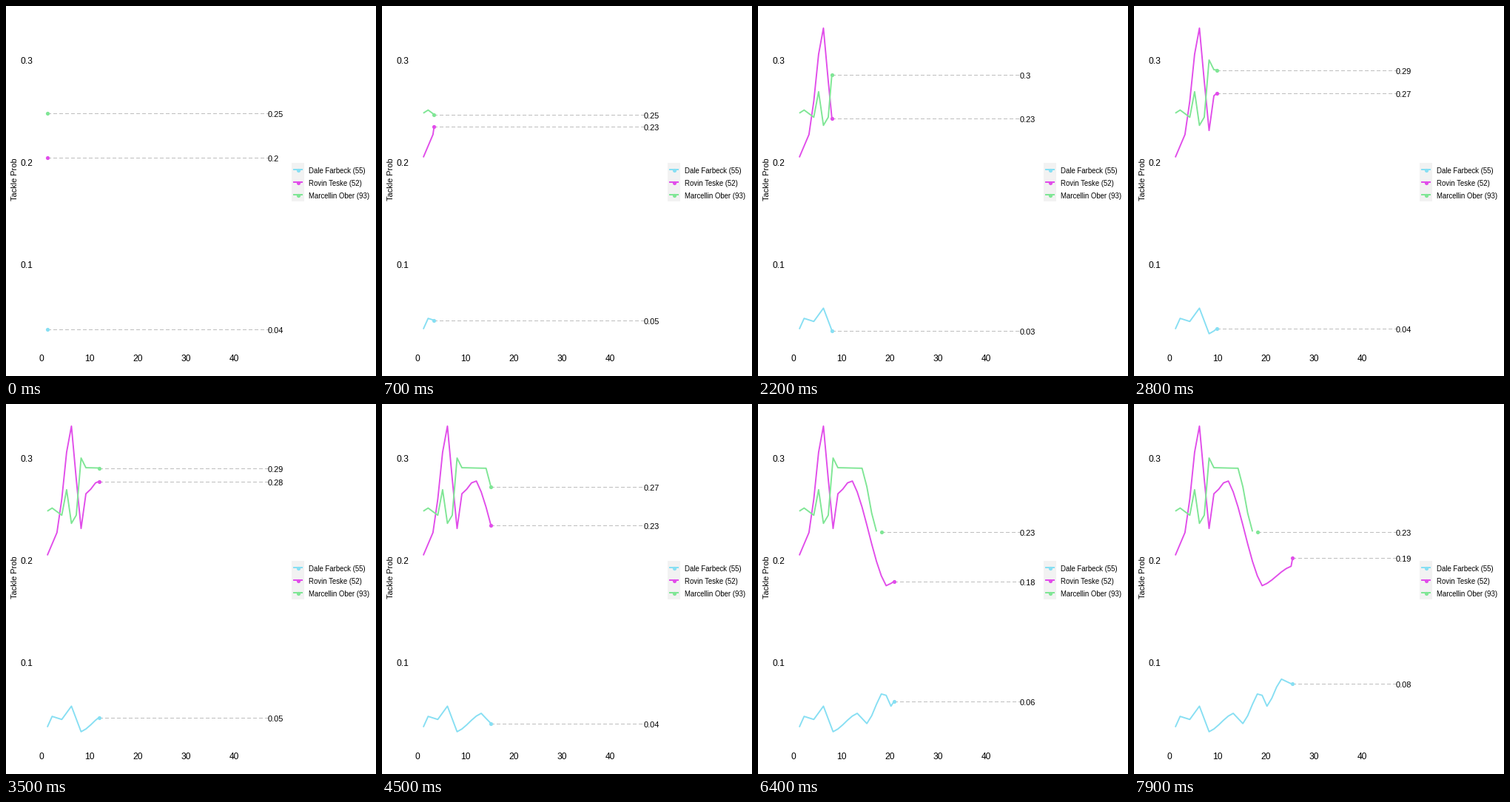
A matplotlib script for the animation above (8000 ms loop, 500 px wide and 500 px high).

```python
import numpy as np
import matplotlib.pyplot as plt
from matplotlib.animation import FuncAnimation
from matplotlib.patches import Rectangle

PX = 0.72                      # points per pixel at 100 dpi
FRAMES, INTERVAL = 80, 100
SPAN, STEPS = 46, 149          # time units covered by the full reveal
X0, DX = 49.3, 6.52            # pixel of x = 0, pixels per unit
Y0, DY = 487.0, 1380.0         # pixel of y = 0, pixels per unit

plt.rcParams["font.family"] = "Liberation Sans"

# name, colour, last time, turning points (time, probability in thousandths)
PLAYERS = [
    ("Dale Farbeck (55)", "#87DFF3", 26,
     [(1, 36.5), (2, 47), (4, 44), (6, 57), (8, 32), (13, 50), (15, 40),
      (18.5, 72), (20, 57), (23, 83.5), (25, 79)]),
    ("Rovin Teske (52)", "#E14DEA", 26,
     [(1, 204.7), (3, 227), (5.9, 334), (8, 231), (9, 265), (11.8, 279),
      (19, 175), (25, 194), (26, 220)]),
    ("Marcellin Ober (93)", "#7FE695", 18,
     [(1, 248), (2, 251), (4, 244), (5, 269), (6, 236), (7, 244), (8, 300),
      (9, 290.5), (14, 290), (17, 228)]),
]

fig = plt.figure(figsize=(5, 5), dpi=100, facecolor="white")
ax = fig.add_axes([0, 0, 1, 1])
ax.set_xlim(0, 500)
ax.set_ylim(500, 0)
ax.axis("off")


def px(t):
    return X0 + DX * np.asarray(t)


def py(v):
    return Y0 - DY * np.asarray(v)


def curve(t, points):
    """Softly eased path through the turning points."""
    kt, kv = np.transpose(points)
    index = np.arange(len(kt))
    pos = np.interp(t, kt, index)
    base = np.floor(pos)
    u = pos - base
    ease = u / 2 + (1 - np.cos(np.pi * u)) / 4
    return np.interp(base + ease, index, kv) / 1000


def label(x, y, s, size, ha="left", **kw):
    return ax.text(x, y, s, fontsize=size * PX, ha=ha, va="center_baseline", **kw)


def line(color, width, **kw):
    return ax.plot([], [], color=color, lw=width * PX, solid_capstyle="butt", **kw)[0]


def dot(color):
    return ax.plot([], [], "o", color=color, ms=5.2 * PX, mew=0, zorder=4)[0]


for v in (0.1, 0.2, 0.3):
    label(36.5, py(v), f"{v:g}", 12, "right")
for t in range(0, 50, 10):
    label(px(t) - 1.2, 475, str(t), 12, "center")
ax.text(12, 234.5, "Tackle Prob", fontsize=11 * PX, rotation=90,
        ha="center", va="center")
ax.add_patch(Rectangle((386, 212), 17, 52, fc="#F2F2F2", ec="none"))


class Track:
    def __init__(self, row, name, color, end, points):
        self.t = np.arange(1, end + 1)
        self.v = curve(self.t, points)
        self.keys = np.round((self.t - 1) * STEPS / SPAN)
        self.dash = line("#BEBEBE", 1, linestyle=(0, (5, 4)), zorder=1,
                         antialiased=False, dash_capstyle="butt")
        self.path = line(color, 1.9, zorder=3)
        self.dot = dot(color)
        self.text = label(354, 0, "", 11, zorder=5)

        y = 221 + 17 * row
        line(color, 2).set_data([388, 401], [y, y])
        dot(color).set_data([394.5], [y + 0.5])
        label(409, y + 1, name, 9.6)

    def draw(self, f):
        t, v = np.interp(f, self.keys, self.t), np.interp(f, self.keys, self.v)
        x, y = px(t), np.floor(py(v)) + 0.5
        past = self.keys < min(f, self.keys[-1])
        xs, ys = px(self.t[past]), py(self.v[past])
        if f <= self.keys[-1]:
            xs, ys = np.append(xs, x), np.append(ys, y)
        self.path.set_data(xs, ys)
        self.dash.set_data([x, px(SPAN + 1)], [y, y])
        self.dot.set_data([x], [y])

        # the label jumps to the next value halfway between points
        i = np.searchsorted(self.keys, f, side="right") - 1
        if i + 1 < len(self.keys) and 2 * f >= self.keys[i] + self.keys[i + 1]:
            i += 1
        self.text.set_text(f"{round(self.v[i], 2):g}")
        self.text.set_y(y + 1.7)


tracks = [Track(i, *p) for i, p in enumerate(PLAYERS)]


def update(f):
    for track in tracks:
        track.draw(f)
    return []


anim = FuncAnimation(fig, update, frames=FRAMES, interval=INTERVAL,
                     repeat=True, repeat_delay=0, blit=False)
plt.show()
```
